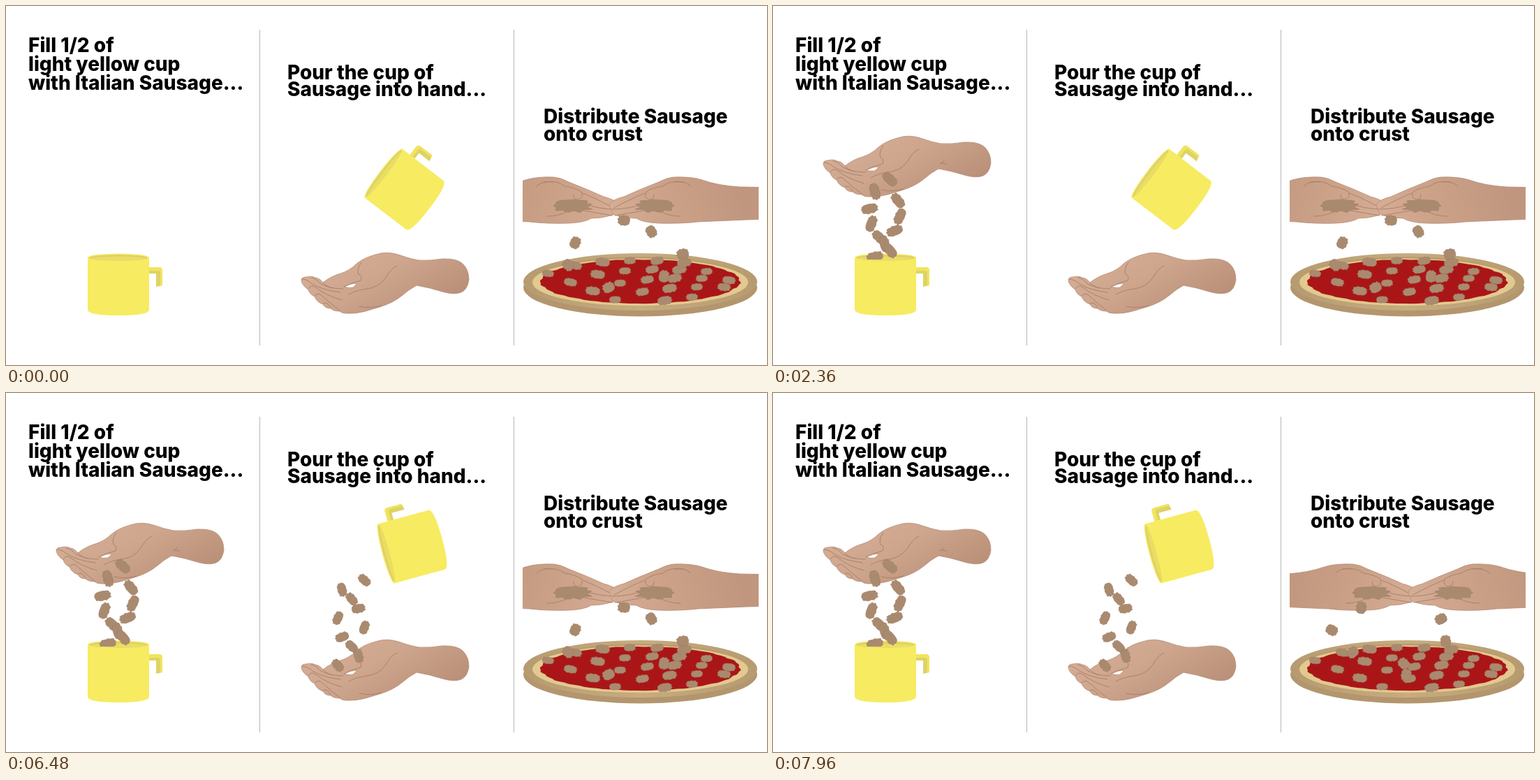
Write an HTML page that moves like this. It is 1090 px wide and 514 px high and loops after 8000 ms.

```html
<!DOCTYPE html>
<html lang="en">
<head>
<meta charset="utf-8">
<title>Adding sausage</title>
<style>
  html, body { margin: 0; width: 100%; height: 100%; overflow: hidden; background: #fff; }
  svg { display: block; width: 1090px; height: 514px; }
  text { font: 800 28px Inter, "Open Sans", sans-serif; fill: #000; }
  .crease { fill: none; stroke: #a67e68; stroke-width: .9; stroke-linecap: round; }
  .skin { stroke: #b58d76; stroke-width: .8; }
  .meat { fill: #aa8a6f; stroke: #a08065; stroke-width: .7; }
</style>
</head>
<body>
<svg viewBox="0 0 1090 514">
  <defs>
    <linearGradient id="palm" x1="0" y1="0" x2="1" y2=".6">
      <stop offset="0" stop-color="#d8b199"/><stop offset=".5" stop-color="#cea58d"/><stop offset="1" stop-color="#b98f78"/>
    </linearGradient>
    <linearGradient id="arm" gradientUnits="userSpaceOnUse" x1="690" y1="250" x2="876" y2="300">
      <stop offset="0" stop-color="#c0967e"/><stop offset=".55" stop-color="#cba188"/><stop offset="1" stop-color="#d6ae95"/>
    </linearGradient>
    <linearGradient id="pan">
      <stop offset="0" stop-color="#b69b70"/><stop offset=".5" stop-color="#c7ac7f"/><stop offset="1" stop-color="#b69b70"/>
    </linearGradient>
    <clipPath id="aboveCup"><rect x="60" y="150" width="280" height="213"/></clipPath>
    <clipPath id="stageRight"><rect x="740" y="230" width="338" height="230"/></clipPath>

    <g id="hand">
      <path class="skin" fill="url(#palm)" fill-rule="evenodd" d="M72 226Q72 221 79 221Q87 219 92 222Q99 223 103 229Q114 220 128 216Q141 212 150 203Q160 194 178 189Q195 183 214 190Q228 195 240 197Q256 198 274 195Q296 194 304 203Q312 211 312 225Q310 239 301 243Q291 247 274 242Q255 236 237 233Q226 239 217 247Q204 258 184 264L164 270Q150 274 136 273Q130 273 127 270Q118 270 114 266Q106 266 103 260Q94 257 91 249Q84 246 82 239Q73 233 72 226Z M133 235Q143 230 152 230Q148 234 146 236Q139 237 133 235Z"/>
      <path class="crease" d="M73 224Q80 224 88 231Q103 240 128 243M86 222Q92 222 100 231Q114 238 132 238M82 238Q86 231 93 236Q106 247 130 254M91 248Q97 242 103 249Q114 259 127 269M103 259Q109 255 114 265M103 229Q107 234 116 237M158 200Q151 210 154 217Q160 219 157 226Q144 229 133 235M209 205Q200 209 193 222Q183 236 166 238Q150 240 140 246M187 262Q170 267 155 263"/>
    </g>

    <g id="cup">
      <path fill="#dfd265" d="M44 15H60Q63 16 63 20V40L54 42V23H44Z"/>
      <path fill="#f1e45d" d="M44 14H60Q63 15 63 19V40H60V21Q59 19 56 19H44Z"/>
      <path fill="#f7eb61" d="M-44 0V75Q-43 83 0 83Q43 83 44 75V0A44 5.5 0 0 0-44 0Z"/>
      <ellipse cy=".4" rx="42" ry="4.3" fill="#ddd167"/>
      <ellipse cy="1.8" rx="40" ry="3" fill="#e9dd64"/>
    </g>

    <g id="armHand">
      <path class="skin" fill="url(#arm)" d="M590 261L690 259Q722 257 744 249Q760 244 785 245Q795 246 806 252Q832 262 856 273Q872 277 876 283Q878 288 874 291Q875 298 866 300Q853 304 838 304Q829 310 806 311Q775 312 750 309L680 306L590 304Z"/>
      <path class="crease" d="M770 252Q790 249 800 258Q815 260 824 266Q828 274 820 277Q812 277 813 270M826 268Q846 276 870 289M825 282Q847 291 873 291M828 293Q850 297 869 300M775 301Q792 301 804 294M760 258Q768 250 783 252"/>
    </g>
  </defs>
  <g id="scene"></g>
</svg>

<script>
const scene = document.getElementById('scene');
const clamp = v => Math.max(0, Math.min(1, v));
const span = (t, a, b) => clamp((t - a) / (b - a));
const easeOut = p => 1 - (1 - p) ** 2;
const easeInOut = p => (1 - Math.cos(Math.PI * p)) / 2;
const mix = (a, b, p) => a + (b - a) * p;
const times = (n, make) => Array.from({ length: n }, (_, i) => make(i));

// Side to side, with a width that swells and shrinks along the row
const sway = (i, drift, phase) => Math.cos(i * (Math.PI + drift) + phase);
const tilt = i => 75 * Math.sin(.9 * i + .6);

const oval = (points, radius) => 'M' + times(points, i => {
  const a = i / points * 2 * Math.PI;
  return radius(i, a).map((r, axis) => (r * (axis ? Math.sin(a) : Math.cos(a))).toFixed(1));
}).join('L') + 'Z';

// Lumpy, slightly squared ellipse
const blob = (rx, ry, seed, rough = .05) => oval(26, (i, a) => {
  const lumps = 1 + rough * (Math.sin(i * 2.4 + seed) + Math.sin(i * 4.1 + seed * 2));
  const k = lumps / (Math.cos(a) ** 4 + Math.sin(a) ** 4) ** .15;
  return [rx * k, ry * k];
});

function add(parent, tag, attrs = {}) {
  const el = document.createElementNS('http://www.w3.org/2000/svg', tag);
  for (const name in attrs) el.setAttribute(name, attrs[name]);
  return parent.appendChild(el);
}
const group = (parent, attrs) => add(parent, 'g', attrs);
const use = (parent, id, transform = '') => add(parent, 'use', { href: '#' + id, transform });

function place(el, x, y, turn = 0, opacity = 1) {
  el.setAttribute('transform', `translate(${x.toFixed(2)} ${y.toFixed(2)}) rotate(${turn.toFixed(2)})`);
  el.setAttribute('opacity', opacity.toFixed(3));
}

function meat(parent, x, y, turn, rx, ry, seed, rough) {
  const el = add(parent, 'path', { class: 'meat', d: blob(rx, ry, seed, rough) });
  place(el, x, y, turn);
  return el;
}

function write(x, y, leading, ...lines) {
  lines.forEach((words, i) => { add(scene, 'text', { x, y: y + i * leading }).textContent = words; });
}

write(32, 66, 27, 'Fill 1/2 of', 'light yellow cup', 'with Italian Sausage...');
write(403, 105, 24, 'Pour the cup of', 'Sausage into hand...');
write(770, 168, 25, 'Distribute Sausage', 'onto crust');
for (const x of [363.5, 727.5]) add(scene, 'path', { d: `M${x} 34V486`, stroke: '#b8b8b8' });

// A column of pieces that falls out of `from` and spreads between two heights
function stream(parent, { count, from, x, width, top, bottom, bend, drift, phase, rx, ry, start, end }) {
  const pieces = times(count, i => ({
    el: meat(parent, 0, 0, 0, rx, ry, i),
    x: x + width * sway(i, drift, phase),
    y: mix(top, bottom, (i / (count - 1)) ** bend),
    turn: tilt(i)
  }));
  return t => {
    const s = span(t, start, end), p = easeOut(s);
    for (const piece of pieces) {
      place(piece.el, mix(mix(from.x, piece.x, .5), piece.x, p), mix(from.y, piece.y, p),
        piece.turn - 70 * (1 - p), clamp(s * 5));
    }
  };
}

// Left: hand above the upright cup
use(scene, 'cup', 'translate(161 360)');
const giver = group(scene);
use(giver, 'hand');
add(giver, 'path', { class: 'crease', d: 'M239 226Q242 224 245 222M241 225L249 226' });
const pile = meat(giver, 155, 233, 4, 27, 14.5, 1, .07);
const dropIntoCup = stream(group(scene, { 'clip-path': 'url(#aboveCup)' }), {
  count: 11, from: { x: 155, y: 236 }, x: 160, width: 22, top: 248, bottom: 359, bend: .8,
  drift: .35, phase: -1.23, rx: 11.5, ry: 6.6, start: 1350, end: 2370
});

// Middle: cup pouring into a hand
use(scene, 'hand', 'translate(351 167)');
const pourIntoHand = stream(group(scene), {
  count: 10, from: { x: 535, y: 245 }, x: 494, width: 20, top: 268, bottom: 390, bend: 1,
  drift: .63, phase: .25, rx: 9.5, ry: 6, start: 4480, end: 5560
});
const tippedCup = use(scene, 'cup');

// Right: pizza with two hands above
const pizza = group(scene, { transform: 'translate(908.5 394.5)' });
const disc = (cy, rx, ry, fill) => add(pizza, 'ellipse', { cy, rx, ry, fill });
disc(8.5, 167.5, 41.5, '#b3966d');
disc(.5, 167.5, 41, 'url(#pan)');
disc(0, 157, 35.5, '#b99c70');
disc(1, 154.5, 34, '#e2c990');
add(pizza, 'path', {
  fill: '#aa1617',
  d: oval(90, i => {
    const wave = 1 + .008 * Math.sin(i * 2.1) + .006 * Math.sin(i * .9);
    return [143 * wave, 31.5 * wave];
  })
});

// Toppings run in slanted rows that start along the far edge of the sauce
times(6, row => {
  const left = -132 + 39 * row;
  const far = -30 * Math.sqrt(1 - (left / 143) ** 2);
  times(5, k => {
    const x = left + 32 * k, y = far + 12.5 * k;
    if (k && Math.hypot(x / 143, y / 32) > .9) return;
    const size = 8 + (row + k) % 3;
    meat(pizza, x, y, tilt(row + k) / 7, size, size * .58, row + k);
  });
});

const right = group(scene, { 'clip-path': 'url(#stageRight)' });
const hands = group(right);
for (const flip of ['', 'translate(1741 0) scale(-1 1)']) {
  const side = group(hands, { transform: flip });
  use(side, 'armHand');
  meat(side, 811, 286, 0, 25, 8.5, 3, .11);
}
const crumbs = times(7, i => meat(right, 0, 0, 0, 8.3, 7, i));

// Crumbs drop in an endless, evenly spaced sequence
function sprinkle(elapsed) {
  const gap = 16, fall = gap * crumbs.length;
  crumbs.forEach((el, i) => {
    const way = 9 + gap * i + .13 * elapsed;
    const depth = way % fall;
    const order = i - crumbs.length * Math.floor(way / fall);
    place(el, 885 + 85 * sway(order, .48, Math.PI / 2), 298 + depth, 47 * i + .5 * depth,
      clamp(depth / 6) * clamp((fall - depth) / 6));
  });
}

function draw(t) {
  const away = 1 - easeOut(span(t, 560, 1280));
  place(giver, 21 * away, 7 * away, 0, span(t, 550, 1100));
  pile.setAttribute('opacity', 1 - span(t, 1350, 1750));
  dropIntoCup(t);

  const tip = easeInOut(span(t, 4220, 5040));
  place(tippedCup, mix(540.5, 544.5, tip), mix(239.5, 230, tip), mix(-52.5, -105.3, tip));
  pourIntoHand(t);

  const elapsed = Math.max(0, t - 6480);
  place(hands, 65.4 * easeInOut(elapsed / 1080), 0);
  sprinkle(elapsed);
}

const start = performance.now();
function tick() {
  draw((performance.now() - start) % 8000);
  requestAnimationFrame(tick);
}
tick();
</script>
</body>
</html>
```
